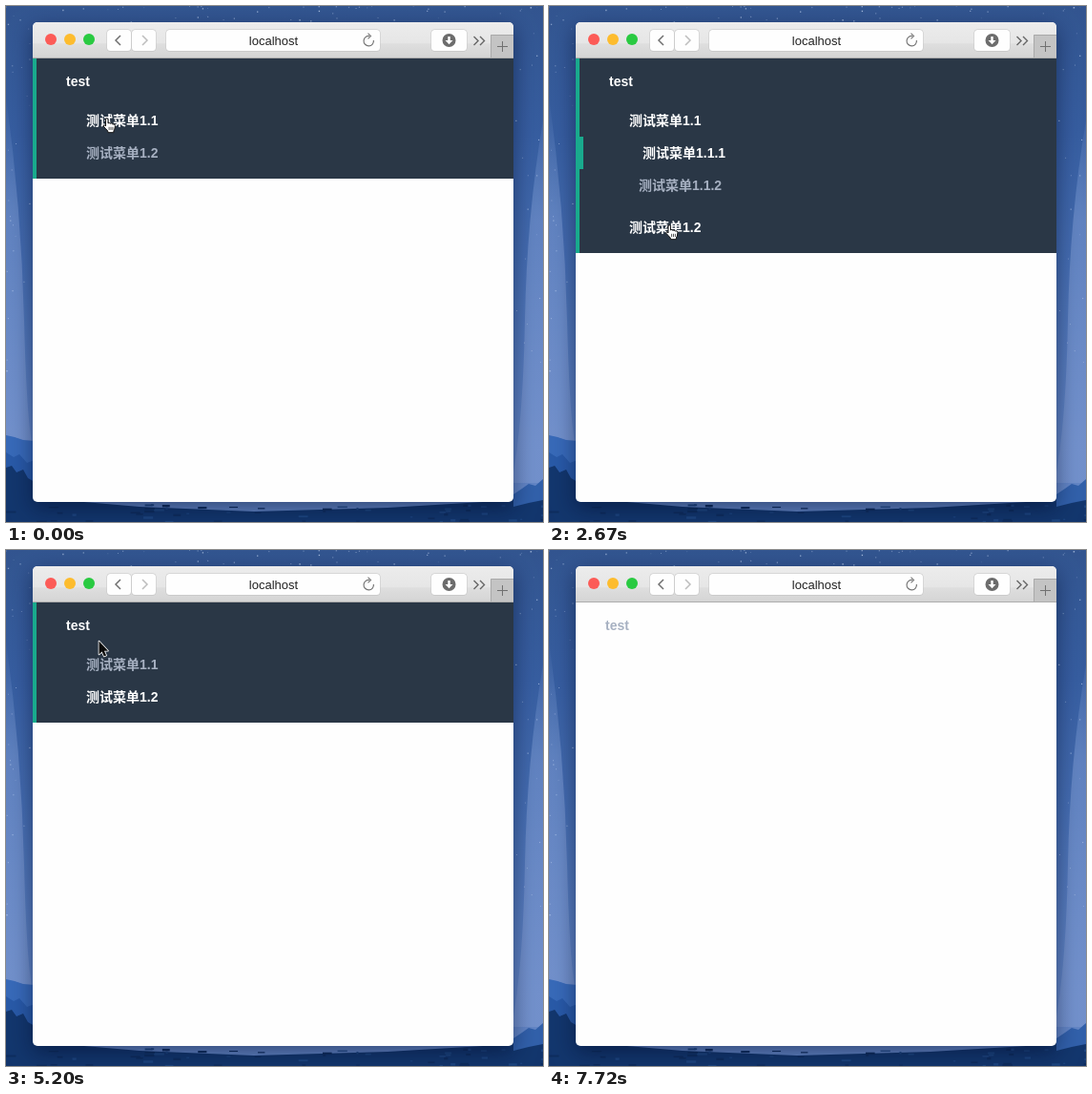
Write an HTML page with a canvas that moves like this. It is 563 by 541 pixels and loops after 7870 ms.

```html
<!DOCTYPE html>
<html lang="zh-CN">
<head>
<meta charset="utf-8">
<title>Menu demo</title>
<style>
  html, body { margin: 0; width: 100%; height: 100%; overflow: hidden; }
  canvas { display: block; }
</style>
</head>
<body>
<canvas id="stage" width="563" height="541"></canvas>
<script>
const W = 563, H = 541, LOOP = 7870;
const BOLD = "bold 14px 'Liberation Sans', 'Noto Sans CJK SC', 'Noto Sans CJK', 'Noto Sans CJK JP', sans-serif";
const DARK = '#2a3746', GREEN = '#19aa8d', DIM = '#a7b1c2';
const ctx = document.getElementById('stage').getContext('2d');

// Each step holds until the next one; omitted fields carry over.
// open: 0 closed, 1 first level, 2 second level; hover and pick: second-level item
const steps = [
  { t: 0, cursor: 'hand', x: 101.5, y: 117, open: 1, first: true, second: false, hover: 0, pick: 0 },
  { t: 300, open: 2 },
  { t: 450, x: 112, y: 139, hover: 1 },
  { t: 590, x: 122, y: 149 },
  { t: 740, x: 126, y: 151, pick: 1 },
  { t: 890, x: 147, y: 187, hover: 2 },
  { t: 1030, x: 148, y: 189 },
  { t: 1180, pick: 2 },
  { t: 1320, x: 148, y: 188 },
  { t: 1620, x: 150, y: 178 },
  { t: 1770, x: 153, y: 158, hover: 1 },
  { t: 1920, x: 154, y: 149 },
  { t: 2220, pick: 1 },
  { t: 2520, x: 132, y: 224, hover: 0, second: true },
  { t: 2670, x: 122, y: 229 },
  { t: 3110, pick: 0 },
  { t: 3860, x: 126, y: 154, hover: 1 },
  { t: 4010, x: 120, y: 146 },
  { t: 4160, x: 110, y: 128, hover: 0 },
  { t: 4300, x: 100, y: 113 },
  { t: 4450, cursor: 'arrow', x: 88, y: 91 },
  { t: 4600, cursor: 'hand', x: 94, y: 114 },
  { t: 4900, open: 1 },
  { t: 5050, x: 96, y: 106 },
  { t: 5200, cursor: 'arrow', x: 97, y: 95, first: false },
  { t: 5500, cursor: 'hand', x: 98, y: 113, first: true },
  { t: 5650, open: 2 },
  { t: 5800, x: 95, y: 108 },
  { t: 5940, cursor: 'arrow', x: 88, y: 96 },
  { t: 6090, cursor: 'beam', x: 78.5, y: 81 },
  { t: 6390, open: 0, title: true },
  { t: 7130, cursor: 'arrow', x: 150, y: 160, title: false },
  { t: 7280, x: 290, y: 300 },
  { t: 7430, x: 430, y: 440 },
  { t: 7570, x: 531, y: 530 },
  { t: 7720, cursor: '' }
];

function rect(g, x, y, w, h, fill) {
  g.fillStyle = fill;
  g.fillRect(x, y, w, h);
}

function round(g, x, y, w, h, r, fill) {
  g.beginPath();
  g.roundRect(x, y, w, h, r);
  g.fillStyle = fill;
  g.fill();
}

function disc(g, x, y, r, fill) {
  g.beginPath();
  g.arc(x, y, r, 0, 7);
  g.fillStyle = fill;
  g.fill();
}

function line(g, path, color, width) {
  g.strokeStyle = color;
  g.lineWidth = width;
  g.stroke(new Path2D(path));
}

function shape(g, path, fill) {
  g.fillStyle = fill;
  g.fill(new Path2D(path));
}

function fade(g, y0, y1, stops) {
  const grad = g.createLinearGradient(0, y0, 0, y1);
  stops.forEach(([at, color]) => grad.addColorStop(at, color));
  return grad;
}

function seeded(seed) {
  return () => (seed = seed * 16807 % 2147483647) / 2147483647;
}

function drawDesktop(g) {
  rect(g, 0, 0, W, H, fade(g, 0, H, [
    [0, '#32548f'], [0.25, '#365c9f'], [0.5, '#456cb0'], [0.85, '#6284c4'], [1, '#6284c4']
  ]));
  const glow = fade(g, 90, 470, [[0, '#6e8dc800'], [0.35, '#6e8dc8b0'], [1, '#7592ccd0']]);
  shape(g, 'M0 95 Q16 210 19 330 T30 470 H0Z', glow);
  shape(g, 'M563 120 Q546 220 544 330 T530 500 H563Z', glow);

  const rnd = seeded(91);
  for (let i = 0; i < 420; i++) {
    const x = rnd() * W, y = rnd() ** 1.5 * 400, size = 0.6 + rnd() * 0.9;
    g.globalAlpha = 0.25 + rnd() * 0.55;
    rect(g, x, y, size, size, '#c8d8f4');
  }
  g.globalAlpha = 1;

  shape(g, 'M0 450 L9 452 L18 455 L30 456 L60 541 H0Z', '#3768b7');
  shape(g, 'M0 468 L8 473 L14 470 L22 479 L30 476 V505 H0Z', '#2858a6');
  shape(g, 'M0 484 L6 482 L11 489 L18 486 L23 495 L30 499 L70 519 L140 525 L260 530 L400 526 L500 520 L532 516 L563 511 V541 H0Z', '#12356c');
  shape(g, 'M532 512 L541 506 L548 501 L555 503 L563 496 V518 L548 521 L532 525Z', '#315fa9');
  for (let i = 0; i < 55; i++) {
    const x = rnd() * W, y = 522 + rnd() * 18;
    rect(g, x, y, 2 + rnd() * 9, 1 + rnd() * 1.5, i % 2 ? '#1d4580' : '#0e2c5d');
  }
}

function drawWindow(g) {
  g.save();
  g.shadowColor = 'rgba(0,10,40,.5)';
  g.shadowBlur = 22;
  g.shadowOffsetY = 7;
  round(g, 28, 17, 504, 503, 5, '#fefefe');
  g.restore();

  round(g, 28, 17, 504, 38, [5, 5, 0, 0], fade(g, 17, 55, [
    [0, '#ececec'], [0.57, '#e6e6e6'], [0.6, '#dedede'], [1, '#d4d4d4']
  ]));
  rect(g, 508, 30, 24, 24, '#c4c4c4');
  line(g, 'M508.5 54V30.5H532', '#a9a9a9', 1);
  rect(g, 28, 54, 504, 1, '#acacac');
  ['#fc5b57', '#fdbc2e', '#29ca41'].forEach((color, i) => disc(g, 47 + i * 20, 35, 6, color));

  [[106, 25], [132, 25], [168, 224], [446, 37]].forEach(([x, w]) => {
    round(g, x - 0.5, 24.5, w + 1, 23.3, 4, '#c6c6c6');
    round(g, x, 25, w, 22, 3.5, '#fefefe');
  });
  line(g, 'M120 31 L115 36 L120 41', '#707070', 1.5);
  line(g, 'M143 31 L148 36 L143 41', '#bdbdbd', 1.5);
  line(g, 'M490.5 32 L495 36.5 L490.5 41 M497 32 L501.5 36.5 L497 41', '#666', 1.4);
  line(g, 'M520.5 37V48 M515 42.5H526', '#707070', 1);

  line(g, 'M381 31.5 A5.2 5.2 0 1 0 385.4 36', '#777', 1.2);
  line(g, 'M379.5 28.7 L382.5 31.5 L379.5 34.3', '#777', 1.1);
  disc(g, 464.5, 36, 7, '#6c6c6c');
  shape(g, 'M463.3 32 H465.7 V36 H468.5 L464.5 40.3 L460.5 36 H463.3Z', '#fff');

  g.font = "13px 'Liberation Sans', Arial, sans-serif";
  g.textAlign = 'center';
  g.fillStyle = '#222';
  g.fillText('localhost', 280.5, 41);
}

const backdrop = document.createElement('canvas');
backdrop.width = W;
backdrop.height = H;
const back = backdrop.getContext('2d');
drawDesktop(back);
drawWindow(back);

const HAND = 'M3 9 V2.1 Q3 .7 4.2 .7 Q5.5 .7 5.5 2.1 V6 Q6.6 4.8 7.9 6.3 Q9 5.3 10.2 6.9 Q12.6 6 12.9 8.6 L12.6 11 Q12.2 13 11.4 14 V15.7 H5.5 L5.2 14 Q3 11.6 .9 9.3 Q.3 7.6 1.8 7.8Z';
const ARROW = 'M.5 .5 V14.5 L3.6 11.6 L5.8 16.5 L8.1 15.5 L6 10.7 H10Z';
const BEAM = 'M-3 .5 Q0 .5 0 2 V11 Q0 12.5 -3 12.5 M3 .5 Q0 .5 0 2 V11 Q0 12.5 3 12.5 M-1.5 8.5 H1.5';

const cursors = {
  hand() {
    shape(ctx, HAND, '#fff');
    line(ctx, HAND, '#111', 1);
    line(ctx, 'M6.6 9.8V13 M8.5 9.8V13 M10.4 9.8V13', '#111', 0.7);
  },
  arrow() {
    line(ctx, ARROW, '#fff', 1.6);
    shape(ctx, ARROW, '#0a0a0a');
  },
  beam() {
    line(ctx, BEAM, 'rgba(255,255,255,.45)', 2.2);
    line(ctx, BEAM, '#111', 1);
  }
};

function label(text, x, y, lit) {
  ctx.fillStyle = lit ? '#fff' : DIM;
  ctx.fillText(text, x, y);
}

function drawMenu(s) {
  ctx.font = BOLD;
  if (!s.open) {
    if (s.title) rect(ctx, 28, 55, 504, 48, DARK);
    label('test', 59, 84, s.title);
    return;
  }
  const wide = s.open === 2;
  const height = wide ? 204 : 126;
  rect(ctx, 28, 55, 504, height, DARK);
  rect(ctx, 28, 55, 4, height, GREEN);
  label('test', 63, 84, true);
  label('测试菜单1.1', 84, 125, s.first);
  if (wide) {
    for (const n of [1, 2]) {
      const picked = s.pick === n, top = 103 + n * 34;
      if (picked) rect(ctx, 32, top, 4, 34, GREEN);
      label('测试菜单1.1.' + n, picked ? 98 : 94, top + 22, picked || s.hover === n);
    }
  }
  label('测试菜单1.2', 84, wide ? 237 : 159, s.second);
}

function drawCursor(s) {
  if (!s.cursor) return;
  ctx.save();
  ctx.translate(s.x, s.y);
  ctx.lineJoin = 'round';
  cursors[s.cursor]();
  ctx.restore();
}

function frame(now) {
  const t = now % LOOP;
  const state = Object.assign({}, ...steps.filter(step => step.t <= t));
  ctx.drawImage(backdrop, 0, 0);
  drawMenu(state);
  drawCursor(state);
}

const start = performance.now();
function tick() {
  frame(performance.now() - start);
  requestAnimationFrame(tick);
}
tick();
</script>
</body>
</html>
```
